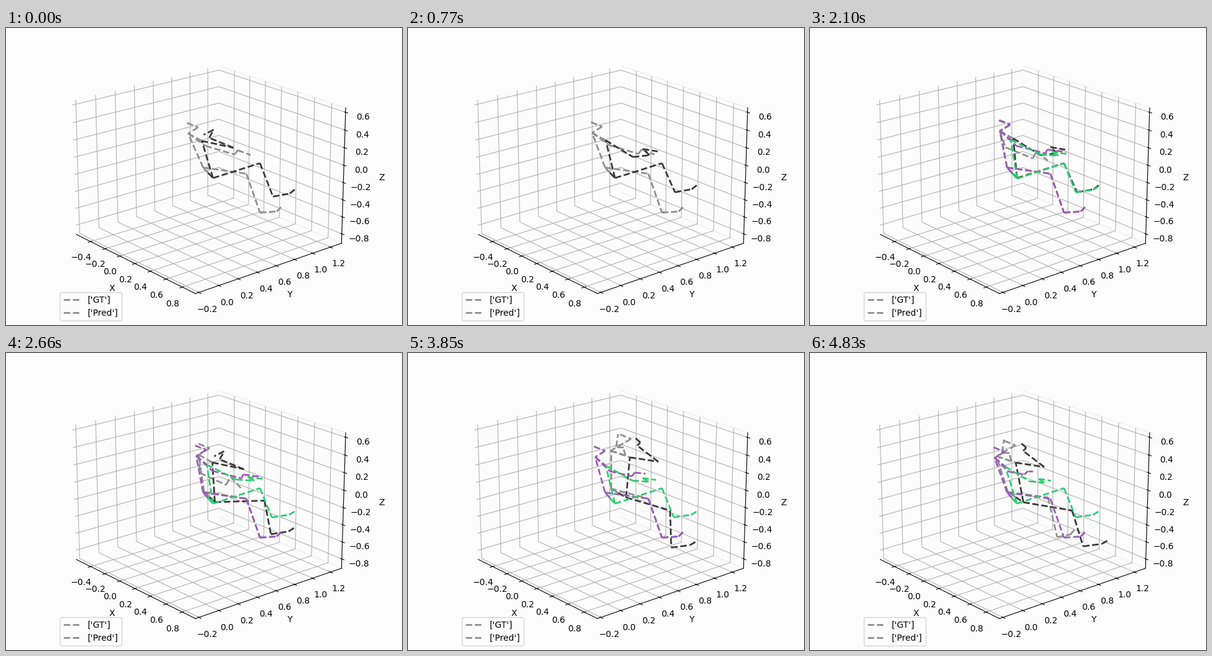
A matplotlib script that plays this animation: 640 by 480 pixels, repeating every 4900 ms.

```python
import numpy as np
import matplotlib.pyplot as plt
from matplotlib.animation import FuncAnimation
from matplotlib.collections import LineCollection
from matplotlib.lines import Line2D

W, H, DPI = 640, 480, 100
FRAMES, INTERVAL = 70, 70
PRED_START = 20
PAPER = "#fcfcfc"
GREY, DARK = "#8e8e8e", "#383838"
PURPLE, GREEN = "#9b59b6", "#2ecc71"

plt.rcParams.update({"figure.facecolor": PAPER, "axes.facecolor": PAPER,
                     "font.family": "DejaVu Sans", "font.size": 10})
fig = plt.figure(figsize=(W / DPI, H / DPI), dpi=DPI)


# Static 3D box
def ticks(lo, hi):
    return np.arange(lo, hi + 1, 2) / 10


def span(center, half=0.75 * 25 / 24):
    return center - half, center + half


box = fig.add_axes([0, 0, 1, 1], projection="3d")
box.view_init(elev=20, azim=-40)
box.set(xlim=span(0.178), ylim=span(0.547), zlim=span(-0.13),
        xticks=ticks(-4, 8), yticks=ticks(-2, 12), zticks=ticks(-8, 6),
        xlabel="X", ylabel="Y", zlabel="Z")
for axis in (box.xaxis, box.yaxis, box.zaxis):
    axis.set_pane_color((1, 1, 1, 0))
box.yaxis.pane.set_alpha(None)
box.yaxis.pane.set_facecolor("none")
box.yaxis.pane.set_edgecolor("#eeeeee")
box.legend(handles=[Line2D([], [], color=GREY, lw=2, ls="--", label=name)
                    for name in ("['GT']", "['Pred']")], loc="lower left")

# Flat layer in screen pixels for the skeletons
layer = fig.add_axes([0, 0, 1, 1])
layer.set(xlim=(-0.5, W - 0.5), ylim=(H - 0.5, -0.5))
layer.axis("off")


def ramp(k, start, end):
    """Ease from 0 to 1 between two frames."""
    t = np.clip((k - start) / (end - start), 0, 1)
    return t * t * (3 - 2 * t)


def mix(a, b, t):
    return a + (b - a) * t


def points(*xy):
    return np.array(xy, float)


# Seated body; legs run hip, knee, ankle, foot, toe
HEAD = points((292, 153), (310, 160))
L_SHOULDER, R_SHOULDER = points((294, 170), (316, 182))
L_LEG = points((318, 225), (388, 235), (410, 298), (437, 296), (444, 289))
R_LEG = points((334, 242), (410, 218), (431, 265), (458, 260), (467, 253))
R_STAND = points((334, 242), (423, 254), (425, 314), (455, 310), (464, 305))

# Arms relative to the shoulder: elbow, wrist, hand, tip
R_FOLD = points((51, 11), (12, -5), (19, -18), (3, -10))
R_REACH = points((44, 27), (71, 24), (60, 14), (84, 18))
R_RAISE = points((46, 7), (12, -19), (17, -24), (6, -34))
L_REACH = points((28, 20), (75, 34), (80, 27), (101, 35))
L_DROP = points((-6, 32), (35, 53), (43, 38), (58, 59))
L_RAISE = points((24, 8), (20, -6), (9, -6), (12, -27))
R_GUESS = points((48, 24), (77, 26), (66, 20), (90, 23))
L_GUESS = points((26, 24), (73, 36), (76, 30), (106, 34))
L_TUCK = points((22, 22), (48, 27), (54, 21), (61, 21))


def arm(shoulder, offsets):
    return np.vstack([shoulder, shoulder + offsets])


def true_body(k):
    """Reach out, then stand up with raised arms and step."""
    lean = np.interp(k, [0, 11, 30, 38, 46, 55, 69],
                     [0, 3, 12, 17, 32, 42, 16])
    lift = max(lean - 12, 0)
    up = ramp(k, 46, 55)
    step = ramp(k, 64, 69)
    reach = ramp(k, 1, 10) - ramp(k, 30, 37)
    drop = np.clip((k - 11) / 35, 0, 1)

    head = HEAD + lean * points(1.1, -0.4) + up * points(4, -5)
    l_sh = L_SHOULDER + lean * points(1, -0.35) - up * points(9, -2)
    r_sh = R_SHOULDER + lean * points(1, -0.33)
    l_arm = mix(mix(L_REACH, L_DROP, drop), L_RAISE, up)
    r_arm = mix(mix(R_FOLD, R_REACH, reach), R_RAISE, up)

    l_leg = L_LEG.copy()
    l_leg[0] += lift * points(0.3, -0.22)
    l_leg[1:] -= step * points((4, 2), (11, 1), (17, 3), (17, 4))
    r_leg = mix(R_LEG, R_STAND, ramp(k, 31, 44))
    r_leg[2:4, 1] += 7 * (1 - ramp(k, 0, 11))
    r_leg[4, 1] += 7 * (1 - ramp(k, 0, 11))
    r_leg[0] += lift * points(0.6, -0.3) + step * points(8, 0)
    r_leg[2:] += step * points(16, -2)
    return head, arm(l_sh, l_arm), arm(r_sh, r_arm), l_leg, r_leg


def guessed_body(k):
    """Stay seated and slowly pull the arms in."""
    sink = np.clip((k - 38) / 31, 0, 1)
    shift = points(13, -4) - sink * points(9, -3)
    calm = (HEAD + shift,
            arm(L_SHOULDER + shift, mix(L_GUESS, L_TUCK, sink)),
            arm(R_SHOULDER + shift - points(5, -2),
                R_GUESS * points(1 - 0.18 * sink, 1)),
            L_LEG, R_LEG + points((0, 1), (0, 0), (-2, 0), (-1, 1), (0, 2)))
    blend = ramp(k, PRED_START, PRED_START + 8)
    return [mix(a, b, blend) for a, b in zip(true_body(PRED_START), calm)]


def chain(joints):
    return list(zip(joints[:-1], joints[1:]))


def bones(body):
    """Split a skeleton into left and right segments."""
    head, l_arm, r_arm, l_leg, r_leg = body
    root = (l_leg[0] + r_leg[0]) / 2
    left = (chain([root, *l_leg]) + chain(l_arm) + chain([*head, l_arm[0]])
            + [(l_leg[0], l_arm[0]), (l_arm[0], r_arm[0])])
    right = chain([root, *r_leg]) + chain(r_arm) + [(r_leg[0], r_arm[0])]
    return left, right


def strokes(color):
    lines = LineCollection([], colors=color, linewidths=2, linestyles="--")
    layer.add_collection(lines, autolim=False)
    return lines


truth_lines = strokes(GREY), strokes(DARK)
guess_lines = strokes(PURPLE), strokes(GREEN)


def update(k):
    for lines, segments in zip(truth_lines, bones(true_body(k))):
        lines.set_segments(segments)
    guess = bones(guessed_body(k)) if k >= PRED_START else ([], [])
    for lines, segments in zip(guess_lines, guess):
        lines.set_segments(segments)
    return truth_lines + guess_lines


anim = FuncAnimation(fig, update, frames=FRAMES, interval=INTERVAL,
                     repeat=True, repeat_delay=0)
plt.show()
```
